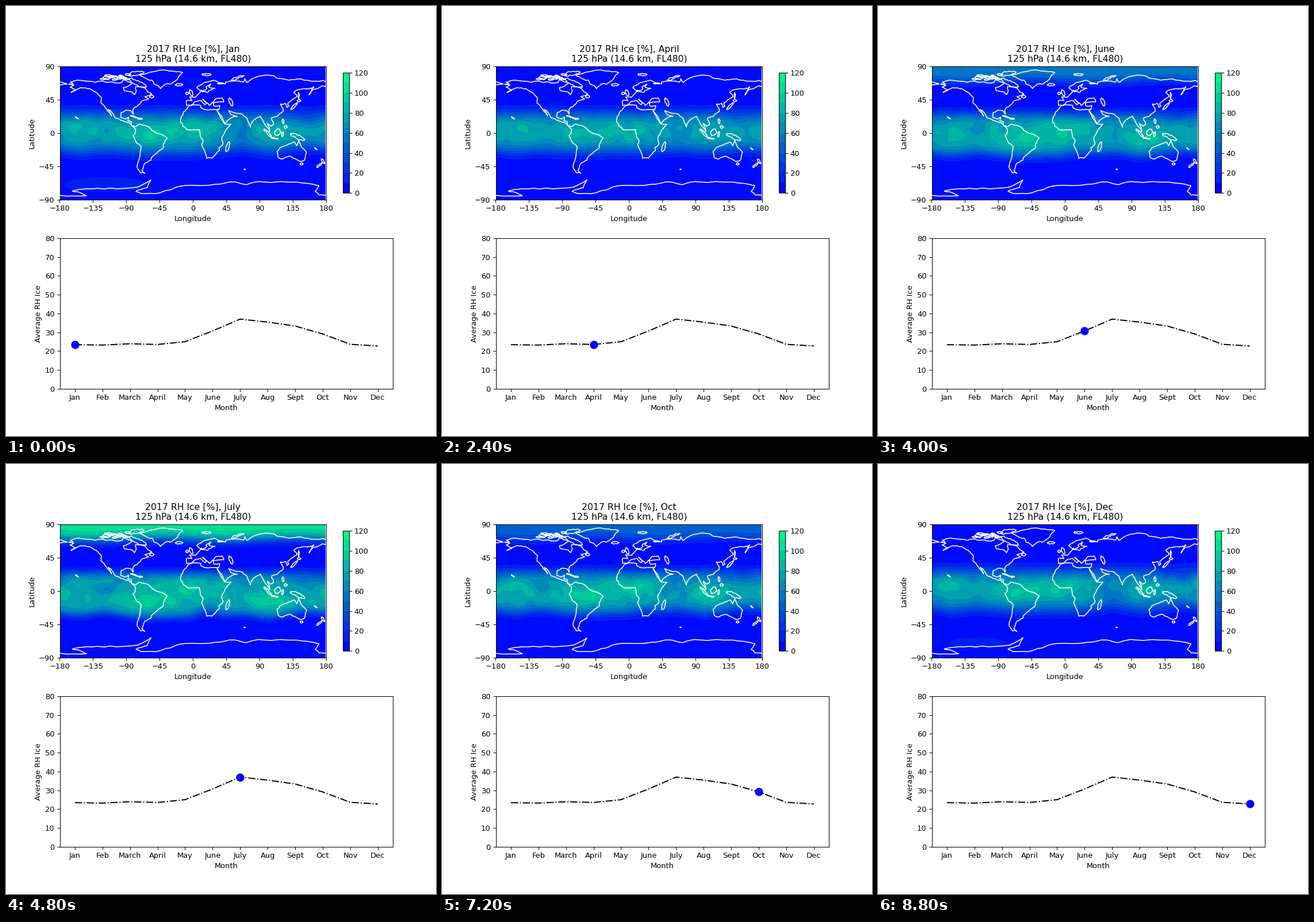
These frames come from a looping animation (748x748 px, 9600 ms). A matplotlib script:

```python
import numpy as np
import matplotlib.pyplot as plt
from matplotlib.animation import FuncAnimation

MONTHS = ["Jan", "Feb", "March", "April", "May", "June",
          "July", "Aug", "Sept", "Oct", "Nov", "Dec"]
AVERAGES = np.array([23.4, 23.2, 23.9, 23.5, 25.0, 30.7, 37.0, 35.4, 33.3, 29.1, 23.6, 22.7])
# How far each month is from the dry season (0) towards the peak (1).
SEASON = (AVERAGES - AVERAGES.min()) / np.ptp(AVERAGES)

rng = np.random.default_rng(7)
plt.rcParams["font.family"] = "DejaVu Sans"
fig, (ax_map, ax_line) = plt.subplots(2, 1, figsize=(8, 8), dpi=93.5)

# ---- humidity field -------------------------------------------------------
lon, lat = np.meshgrid(np.linspace(-180, 178.75, 241), np.linspace(-90, 90, 181))

# lon, width, height, then latitude and strength as (dry season, peak) pairs
REGIONS = [
    (-60, 34, 13, (-1, -14), (18, 17)),     # Amazon
    (0, 34, 13, (8, 4), (15, 15)),          # Atlantic and West Africa
    (105, 23, 11, (4, -14), (11, 20)),      # Maritime Continent
    (65, 22, 20, (0, 12), (-18, -7)),       # Indian Ocean
    (-120, 18, 9, (5, 3), (-3, -20)),       # East Pacific
    (-154, 22, 10, (12, -5), (14, 2)),      # Central Pacific
    (155, 32, 13, (24, 18), (-26, -22)),    # West Pacific
    (18, 20, 9, (-30, -29), (0, -24)),      # Southern Africa
]


def sigmoid(x):
    return 1 / (1 + np.exp(-x))


def texture(seed, waves=24):
    """Smooth random relief, periodic in longitude."""
    r = np.random.default_rng(seed)
    total = np.zeros_like(lon)
    for _ in range(waves):
        k, m = r.integers(2, 15), r.uniform(-15, 15)
        total += np.cos(np.radians(k * lon + m * lat) + r.uniform(0, 2 * np.pi))
    return total / np.sqrt(waves / 2)


def humidity(month):
    s = SEASON[month]
    contrast = 1 - 0.5 * np.exp(-((month - 3) / 1.5) ** 2)
    relief = texture(month)
    core = 77 + 2 * s + 3 * relief
    south = -22.5 - 9.5 * s + 0.5 * relief
    for x, width, height, y, amount in REGIONS:
        dx = (lon - x + 180) % 360 - 180
        bump = contrast * np.interp(s, (0, 1), amount) * np.exp(-(dx / width) ** 2)
        core = core + bump * np.exp(-((lat - np.interp(s, (0, 1), y)) / height) ** 2)
        south = south - 0.2 * bump
    softness = 6 - 2 * s
    band = core * sigmoid((26 - 2.5 * s - lat) / softness) * sigmoid((lat - south) / softness)
    arctic = 107 * s * sigmoid((lat - 70.5 + 1.5 * np.sin(np.radians(2 * lon))) / 4.5)
    summer = max(0, np.cos(np.pi * month / 6)) ** 2
    antarctic = 17 * summer * np.exp(-((lon + 118) / 75) ** 2 - ((lat + 70) / 13) ** 2)
    return np.clip(band + arctic + antarctic, 0, 119)


layers = [ax_map.contourf(lon, lat, humidity(m), levels=np.arange(0, 121, 10), cmap="winter")
          for m in range(12)]
fig.colorbar(layers[0], ax=ax_map, shrink=0.8, ticks=range(0, 121, 20))


# ---- coastlines -----------------------------------------------------------
def coast(points, rough=0.07):
    """Join key points by a line roughened with two midpoint displacements."""
    p = np.array(points, float)
    for _ in range(2):
        step = np.diff(p, axis=0)
        shift = step[:, ::-1] * (1, -1) * rng.normal(0, rough, (len(step), 1))
        out = np.empty((2 * len(p) - 1, 2))
        out[::2], out[1::2] = p, p[:-1] + step / 2 + shift
        p = out
    ax_map.plot(*p.T, color="white", lw=1.2, zorder=3)


def island(x, y, length, width, tilt=0):
    """A rough ellipse given by its half axes."""
    t, a = np.linspace(0, 2 * np.pi, 9), np.radians(tilt)
    u, v = length * np.cos(t), width * np.sin(t)
    coast(np.c_[x + u * np.cos(a) - v * np.sin(a), y + u * np.sin(a) + v * np.cos(a)], 0.12)


# Americas, Pacific side and South America
coast([(-141, 69.6), (-156, 71.2), (-166, 68.4), (-162, 66.3), (-168, 65.6), (-161, 64.4),
       (-166, 61.7), (-158, 57.5), (-164.8, 54.6), (-151.5, 61), (-139.5, 59.6),
       (-130.5, 54.5), (-124, 48), (-124.3, 40.3), (-117, 32.5), (-110, 23), (-114.7, 31.5),
       (-105.5, 20.5), (-94.5, 16.2), (-80.3, 7.4), (-77.4, 4), (-81, -4), (-76.2, -13.8),
       (-70.3, -18.3), (-71.5, -30), (-75.5, -47), (-71, -54), (-65.2, -54.7), (-69, -51),
       (-65, -41), (-57, -37), (-48.6, -27), (-40.8, -21), (-39, -14), (-35, -7), (-50, 0),
       (-60.5, 8.5), (-72, 12), (-77, 8.5), (-83, 10)])
# Americas, Atlantic and Arctic side
coast([(-83, 10), (-83.3, 15), (-88, 16), (-87, 21.3), (-91, 18.8), (-97.5, 21), (-97, 27.5),
       (-84.5, 29.9), (-81, 25.2), (-81.3, 31), (-75.7, 35.5), (-70, 42), (-66, 44), (-60, 46),
       (-65, 49), (-60, 50.2), (-55.7, 52.5), (-64.5, 60.2), (-77.5, 62.5), (-76.6, 56.5),
       (-79, 51.5), (-82.3, 55.2), (-92.7, 57), (-94, 61), (-81.5, 67.3), (-94, 71.8),
       (-96, 68), (-114, 68.5), (-124, 70), (-141, 69.6)])
# Greenland
coast([(-44, 60), (-53, 66), (-55, 71), (-68, 76), (-72, 78.5), (-58, 82), (-32, 83.5),
       (-14, 81.5), (-20, 75), (-24, 70), (-38, 65.5), (-44, 60)])
# Europe
coast([(28, 71), (14, 67.5), (5, 61), (8, 58), (12.8, 55.6), (18.8, 60), (17.5, 62), (24, 65.8),
       (21.3, 62), (29.5, 60), (21.3, 57), (19, 54.5), (10.6, 57.5), (8.7, 53.9), (-4.7, 48.4),
       (-1.5, 43.5), (-9, 43.3), (-8.8, 37), (-2, 36.8), (3.2, 42.5), (9.8, 44), (16, 38),
       (18.4, 40.2), (13, 45.5), (22, 37), (26, 40.9), (31, 46.5), (39, 47.2), (41.5, 42),
       (27, 40.5), (28, 36.7), (36, 36.7), (34.3, 31.3)])
# Africa
coast([(34.3, 31.3), (20, 31), (10.5, 34), (10.5, 37), (-6, 35.7), (-13, 27.8), (-17, 15),
       (-8, 4.4), (8.5, 4.5), (9.3, 0), (13.7, -10.5), (11.8, -16.5), (18.4, -34.3),
       (25.7, -34), (35.5, -24), (34.8, -20), (40.5, -15), (39, -6), (51.2, 11.8), (43, 12),
       (37, 21), (32.6, 30)])
# Southern and eastern Asia
coast([(32.6, 30), (39, 21.5), (43.5, 12.7), (59.8, 22.5), (51.5, 24.5), (48, 30), (56, 27),
       (67, 25), (72.7, 20), (77.5, 8), (80.3, 15.5), (91, 22.5), (94.3, 16.5), (98.5, 9),
       (103.5, 1.3), (100.5, 13), (105, 9), (109, 12), (106, 20), (114, 22.3), (121.8, 29),
       (120, 35), (118, 39), (125, 39.5), (126.5, 34.5), (129.3, 36), (128, 40), (140.4, 49),
       (136, 55), (155, 59.3), (163, 62), (156.7, 51.2), (163, 59), (179, 62.5), (180, 65)])
# Arctic Asia
coast([(28, 71), (41, 67), (33, 66.7), (44, 66), (44, 68.4), (68, 68.5), (70, 73), (73, 68),
       (81, 73.6), (104, 77.6), (113, 74), (130, 71), (140, 72.5), (160, 69.7), (180, 69)])
coast([(-180, 69), (-170, 66), (-180, 65)])
# Australia
coast([(142.5, -10.7), (146.3, -19), (153.2, -26), (150, -37.3), (144, -38.7), (137, -34.5),
       (130, -31.5), (118, -35), (115, -33), (113.5, -25), (122.2, -18), (129, -15),
       (136.8, -12.2), (140, -17.5), (142.5, -10.7)])
# Antarctica
coast([(-180, -84.3), (-144, -85), (-152, -81), (-163, -78.5), (-145, -75.5), (-112, -74.5),
       (-75, -73.3), (-57, -63.5), (-62, -74), (-77, -79), (-70, -82), (-45, -81), (-28, -76),
       (-10, -71), (30, -69.5), (56, -66.3), (72, -70), (95, -66.3), (140, -66.5),
       (170, -71.5), (165, -79), (170, -83.8), (180, -84.3)], 0.04)

for shape in [
    (-2.5, 54, 4.5, 2, 110), (-8, 53.3, 2, 1.6), (-19, 65, 5, 1.4), (51, 41.5, 5.8, 2.2, 110),
    (46.8, -19, 7, 2.2, 72), (101, -0.3, 7.5, 1.6, -47), (110, -7.3, 4.8, 0.7, -9),
    (114, 0.8, 5, 3.5, 55), (121, -2, 3.5, 1.2, 80), (141, -5.5, 10.5, 2.5, -22),
    (121.5, 15.5, 3.2, 1.2, 100), (125, 8, 2, 1.8), (136.5, 36, 6.5, 1.3, 45),
    (143, 43.4, 2.3, 1.4), (142.7, 50, 4, 0.6, 90), (175.5, -38.3, 3.8, 1.4, -55),
    (170.5, -43.8, 4.5, 1.2, 40), (146.5, -42, 1.8, 1.5), (165.5, -21.3, 2, 0.3, -40),
    (-157, 20.3, 2.4, 0.4, -35), (-79.5, 21.6, 5.3, 0.7, -18), (-71.3, 19, 2.8, 0.9),
    (-56, 49, 2.8, 2), (69.5, -49.3, 0.8, 0.4), (60, 74, 9, 1.2, 20), (18, 78.7, 6, 1.6),
    (-75, 67.8, 13, 3, -26), (-77, 80, 11, 2.6, 12),
]:
    island(*shape)
# Canadian Arctic archipelago
for x in np.linspace(-120, -88, 12):
    island(x, rng.uniform(71.5, 79), rng.uniform(3, 6), rng.uniform(0.7, 1.5), rng.uniform(-15, 15))

ax_map.set_aspect("equal")
ax_map.set(xlim=(-180, 180), ylim=(-90, 90), xticks=range(-180, 181, 45),
           yticks=range(-90, 91, 45), xlabel="Longitude", ylabel="Latitude")
title = ax_map.set_title("")

# ---- monthly averages -----------------------------------------------------
ax_line.plot(MONTHS, AVERAGES, "k-.")
ax_line.set(ylim=(0, 80), xlabel="Month", ylabel="Average RH Ice")
marker, = ax_line.plot([0], [AVERAGES[0]], "o", color="blue", markersize=10)


def update(month):
    for m, layer in enumerate(layers):
        layer.set_visible(m == month)
    title.set_text(f"2017 RH Ice [%], {MONTHS[month]}\n125 hPa (14.6 km, FL480)")
    marker.set_data([month], [AVERAGES[month]])
    return [*layers, title, marker]


anim = FuncAnimation(fig, update, frames=12, interval=800, repeat=True)
plt.show()
```
